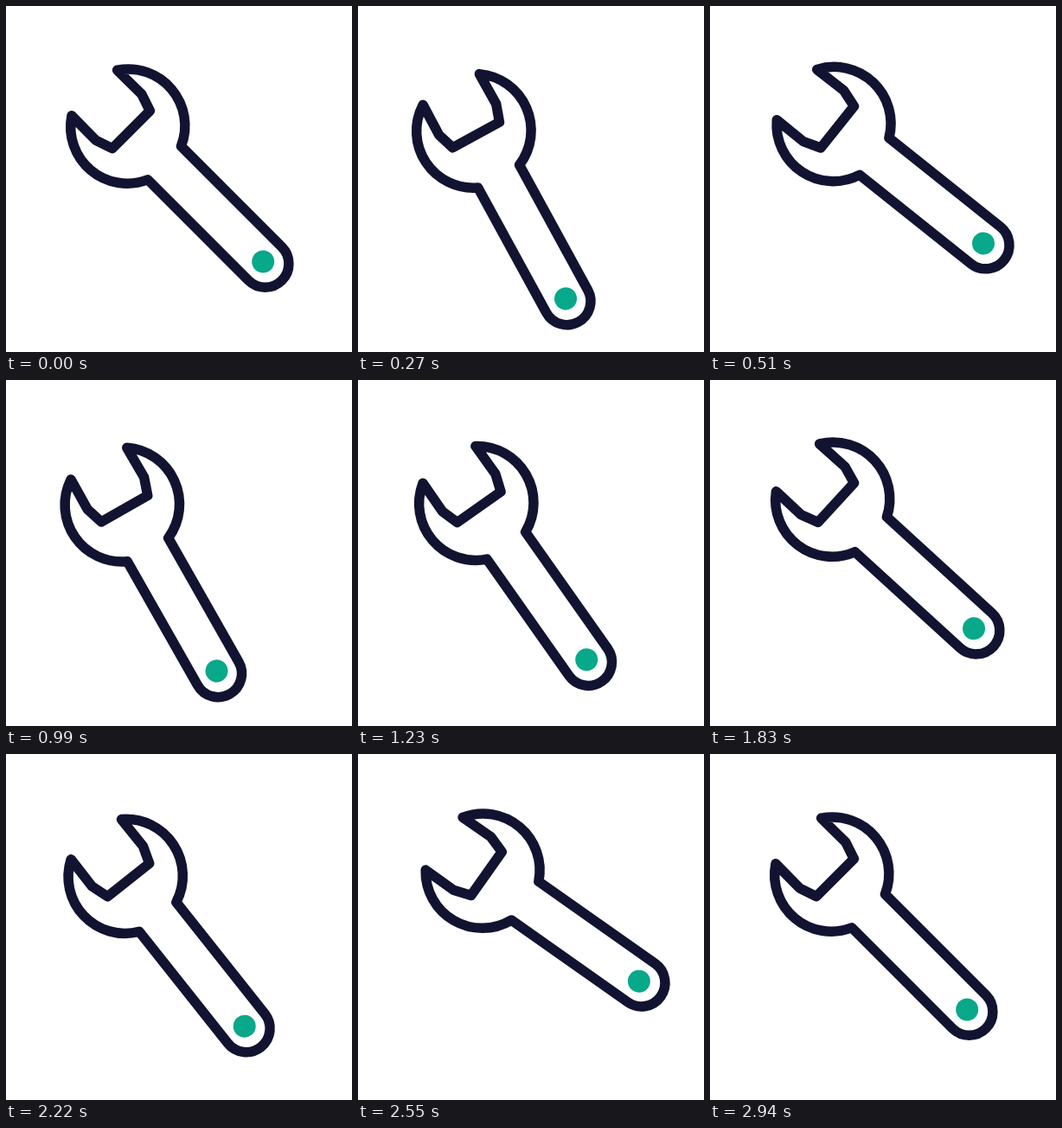
An HTML page for the animation above (2.97 s loop, 400 by 400 pixels).

```html
<!DOCTYPE html>
<html lang="en">
<head>
<meta charset="utf-8">
<title>Wrench</title>
<style>
  html, body { margin: 0; width: 100%; height: 100%; overflow: hidden; background: #fff; }
  svg { display: block; width: 100%; height: 100%; }
</style>
</head>
<body>
<svg viewBox="0 0 400 400">
  <!-- Drawn along the x axis with the pivot at the origin -->
  <g id="wrench">
    <path fill="none" stroke="#121331" stroke-width="11.5" stroke-linejoin="round"
      d="M-24.1 37.2 L15.4 37.6 L35.8 30.8 V-30.8 L15.4 -37.6 L-24.1 -37.2
         A65.5 65.5 0 0 1 90.3 -27.3 H255 A27.3 27.3 0 0 1 255 27.3 H90.3
         A65.5 65.5 0 0 1 -24.1 37.2 Z"/>
    <circle cx="251.6" r="13" fill="#08a88a"/>
  </g>
</svg>
<script>
const STEP = 30, LOOP = 2970;
const HIGH = 21.4, LOW = -9.8;
const wrench = document.getElementById('wrench');

// Cubic Bezier easing with handles (a, 0) and (b, 1), solved by bisection.
function bezier(a, b) {
  return x => {
    let lo = 0, hi = 1;
    for (let i = 0; i < 30; i++) {
      const s = (lo + hi) / 2, r = 1 - s;
      if (3 * r * r * s * a + 3 * r * s * s * b + s * s * s < x) lo = s;
      else hi = s;
    }
    return lo * lo * (3 - 2 * lo);
  };
}

const rise = bezier(0.58, 0.38);
const fall = bezier(0.3, 0.04);
const lastFall = bezier(0.35, 0.1);
const settle = bezier(0.25, 0.05);

// [start step, end step, from angle, to angle, easing]
const swings = [
  [0, 6, 0, HIGH, rise],
  [6, 26, HIGH, LOW, fall],
  [26, 37, LOW, HIGH, rise],
  [37, 56, HIGH, LOW, fall],
  [57, 68, LOW, HIGH, rise],
  [69.5, 85.3, HIGH, LOW, lastFall],
  [85.3, 98, LOW, 0, settle]
];

function angleAt(step) {
  const [start, end, from, to, ease] = swings.findLast(s => s[0] <= step);
  const u = Math.min(1, (step - start) / (end - start));
  return from + (to - from) * ease(u);
}

function draw(ms) {
  const step = Math.floor((ms % LOOP) / STEP);
  wrench.setAttribute('transform', `translate(119.3 117.6) rotate(${45 + angleAt(step)})`);
}

let origin = null;
function tick(now) {
  if (origin === null) origin = now;
  draw(now - origin);
  requestAnimationFrame(tick);
}

draw(0);
requestAnimationFrame(tick);
</script>
</body>
</html>
```
